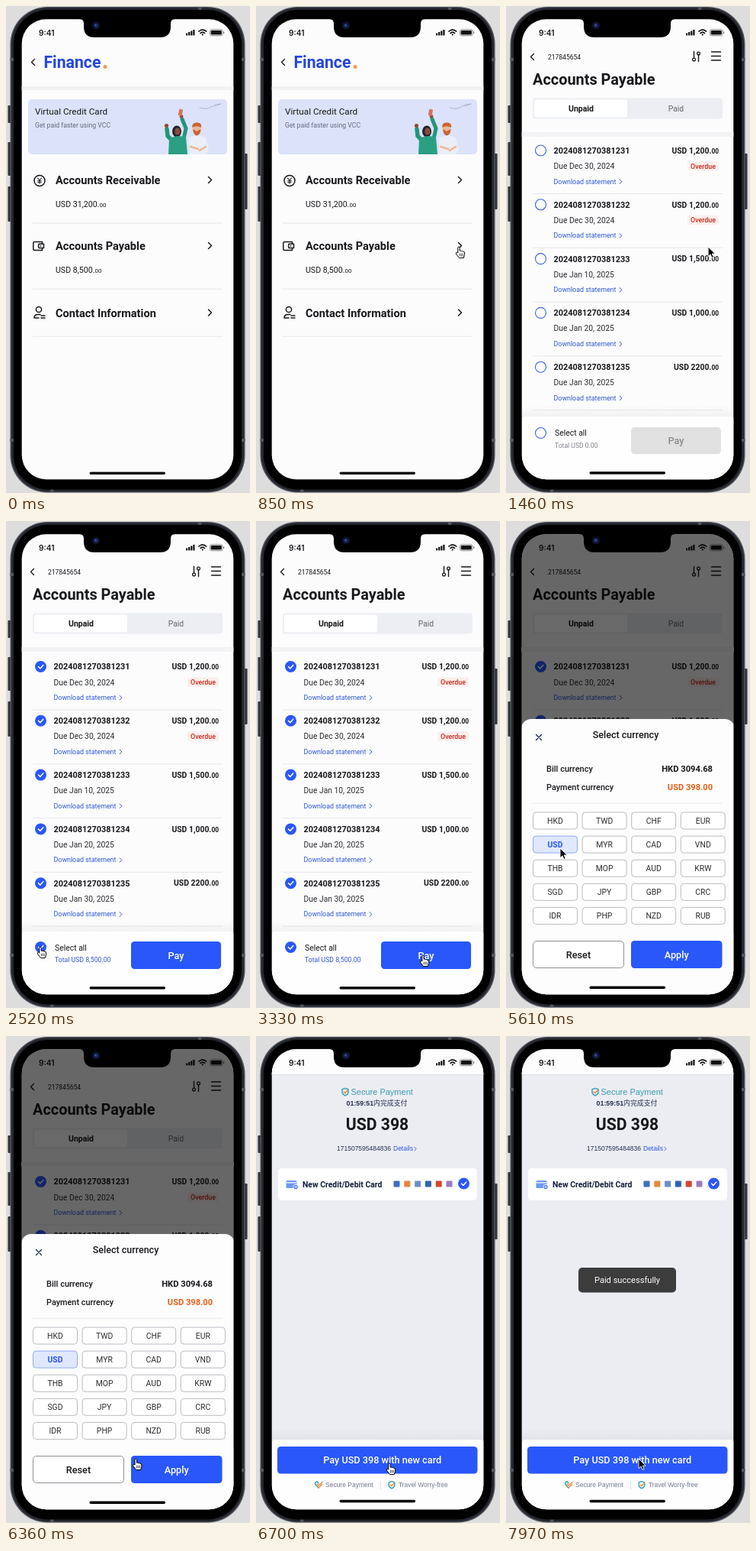
Animation, 320 px wide and 637 px high, one loop 8000 ms. Source, as an HTML page:

```html
<!DOCTYPE html>
<html lang="en">
<head>
<meta charset="utf-8">
<title>Paying a bill on the phone</title>
<style>
  html, body { margin: 0; width: 100%; height: 100%; overflow: hidden; background: #dedddd; }
  svg { display: block; width: 100%; height: 100%; }
  text { white-space: pre; }
</style>
</head>
<body>
<svg id="stage" viewBox="0 0 320 637" preserveAspectRatio="none"></svg>
<script>
const LOOP = 8000;
const INK = '#17181b', BLUE = '#2957fa', LINK = '#2f56d6';
const UI = 'Roboto, sans-serif', PLAIN = "'Liberation Sans', 'Noto Sans CJK SC', sans-serif";

// Drawing helpers; text is centred vertically on its capitals.
const text = (x, cy, size, str, { fill = INK, weight = 400, anchor = 'start', font = UI } = {}) =>
  `<text x="${x}" y="${cy + size * 0.36}" font-size="${size}" font-family="${font}" font-weight="${weight}" fill="${fill}" text-anchor="${anchor}">${str}</text>`;
const rect = (x, y, w, h, fill, r = 0, stroke = 'none') =>
  `<rect x="${x}" y="${y}" width="${w}" height="${h}" rx="${r}" fill="${fill}" stroke="${stroke}"/>`;
const circle = (x, y, r, fill, stroke = 'none', width = 1) =>
  `<circle cx="${x}" cy="${y}" r="${r}" fill="${fill}" stroke="${stroke}" stroke-width="${width}"/>`;
const line = (d, color = INK, width = 1.4) =>
  `<path d="${d}" fill="none" stroke="${color}" stroke-width="${width}" stroke-linecap="round" stroke-linejoin="round"/>`;
const shape = (d, fill) => `<path d="${d}" fill="${fill}"/>`;
const group = (id, content) => `<g id="${id}">${content}</g>`;
const rule = y => rect(35, y, 249, 1, '#e6e7ea');
const chevron = (x, y, s, color = INK, width = 1.4) => line(`M${x - s / 2} ${y - s}l${s} ${s}l${-s} ${s}`, color, width);
const back = (x, y) => line(`M${x + 2} ${y - 4}l-4 4l4 4`);
const tick = (x, y, r = 7.5) => circle(x, y, r, BLUE) + line(`M${x - 3} ${y}l2.3 2.4l4-4.4`, '#fff', 1.5);
const radio = (x, y, on) => on ? tick(x, y) : circle(x, y, 7, '#fff', '#3a62dc', 1.1);
const button = (x, y, w, h, label, fill, color, { stroke, labelX = x + w / 2 } = {}) =>
  rect(x, y, w, h, fill, 4.5, stroke) + text(labelX, y + h / 2, 12.7, label, { fill: color, weight: 500, anchor: 'middle' });
const amount = (str, cents) => `${str}<tspan font-size="${cents}">00</tspan>`;
const bottomBar = top => rect(21, top - 14, 278, 18, 'url(#shade)') + rect(21, top, 278, 620 - top, '#fefefe', 4);
const homeBar = y => rect(109.5, y, 99.5, 3.4, '#000', 1.7);
const shield = (x, y, s) => `<g transform="translate(${x} ${y}) scale(${s})">`
  + line('M0-4.6L4-3.2V.5Q4 3.2 0 5Q-4 3.2-4 .5V-3.2Z', '#35a3b4', 1.5) + line('M-1.8 0L-.2 1.6L3.6-2.4', '#ef8a3c', 1.5) + '</g>';

function statusBar() {
  const bars = [3, 4.5, 6, 7.5].map((h, i) => rect(236 + i * 3.1, 38.5 - h, 2.2, h, '#111', 0.6)).join('');
  return text(43, 35, 10.2, '9:41', { weight: 600, font: 'Inter, sans-serif' }) + bars
    + line('M253 33.2q4.8-4 9.6 0', '#111', 1.6) + line('M255 35.6q2.8-2.3 5.6 0', '#111', 1.6) + circle(257.8, 37.6, 1.1, '#111')
    + rect(267.5, 30.8, 16.5, 8, '#fff', 2.3, '#888') + rect(268.7, 32, 14.1, 5.6, '#111', 1.4) + rect(285, 33.2, 1.3, 3, '#888', 0.6);
}

function banner() {
  const people =
    line('M218 176L212 170L211 161', '#249579', 5.5) + circle(210.5, 156.5, 2.6, '#8a4d38')
    + line('M233 174L236 160L231 148', '#249579', 5) + circle(230, 144.5, 2.4, '#8a4d38')
    + `<g transform="rotate(12 229 139)">${rect(226.5, 135, 5, 8.5, '#d9735a', 1)}</g>`
    + `<ellipse cx="224" cy="164" rx="6" ry="7.5" fill="#20232f"/>` + `<ellipse cx="224.8" cy="164" rx="3.5" ry="4.6" fill="#8a4d38"/>`
    + shape('M214 174Q224 167 236 172L238 194H213Z', '#2a9f82')
    + shape('M240 173Q251 166 262 172L266 188L262 194H240Z', '#e9eef7')
    + line('M242 184L252 187M262 184L254 189', '#efb795', 2.6)
    + circle(250, 161, 5.4, '#efb795') + shape('M245 161Q246 169 250 169.5Q255 169 255.5 161L250 164Z', '#cc6430')
    + shape('M244 159Q244 152 250 152.5Q257 152 256 159Q250 155.5 244 159Z', '#cc6430')
    + line('M254 133Q263 136 269 132T282 128L274 131', '#8f98b4', 0.6);
  return rect(29, 122, 261, 72, '#dbe2f9', 5) + `<g clip-path="url(#banner)">${people}</g>`
    + text(38, 137.5, 11.7, 'Virtual Credit Card') + text(38, 156, 8.7, 'Get paid faster using VCC', { fill: '#646a7d' });
}

function homePage() {
  const rows = [['Accounts Receivable', 228], ['Accounts Payable', 314], ['Contact Information', 401.5]]
    .map(([label, y]) => text(65, y, 14.6, label, { weight: 600 }) + chevron(267.5, y - 0.5, 4, INK, 1.5)).join('');
  return rect(20, 17, 280, 603, '#fcfcfd') + back(35.5, 73.5)
    + text(49.5, 73.7, 21.2, 'Finance', { fill: '#2346e0', weight: 700 }) + circle(130, 79.5, 2.5, '#f29a4a')
    + rect(20, 105, 280, 5, '#f2f2f4') + banner() + rows
    + text(65, 259, 10.6, amount('USD 31,200.', 8)) + text(65, 345.2, 10.6, amount('USD 8,500.', 8))
    + circle(44, 228.5, 7, 'none', INK, 1.5) + line('M41.5 225l2.5 3l2.5-3M44 228v4.3M41.7 228.7h4.6M41.7 230.7h4.6', INK, 1.1)
    + line('M47 308.5H37.5Q35.8 308.5 35.8 310V318Q35.8 319.5 37.5 319.5H47.5V317M47.5 308.5V311M43 311.2H49.5V316.4H43Q42 313.8 43 311.2Z', INK, 1.5) + circle(45.4, 313.8, 0.9, INK)
    + circle(43, 397, 3.6, 'none', INK, 1.5) + line('M37 408Q37 403.4 42 403.4H45M37 408H43M46 405H51M46 408H51', INK, 1.5)
    + [283.5, 369.7, 431.7].map(rule).join('') + homeBar(609.4);
}

const BILLS = [['Dec 30, 2024', '1,200'], ['Dec 30, 2024', '1,200'], ['Jan 10, 2025', '1,500'], ['Jan 20, 2025', '1,000'], ['Jan 30, 2025', '2200']];

function payablePage(selected) {
  const rows = BILLS.map(([due, sum], i) => {
    const y = 189 + i * 70.8 + (selected ? 1.5 : 0);
    const overdue = i < 2 ? rect(238, y + 14, 41, 12.5, '#fcefec', 2.5)
      + text(258.5, y + 20.3, 8.9, 'Overdue', { fill: '#c8281c', weight: 500, anchor: 'middle' }) : '';
    return radio(45.5, y, selected) + text(62.5, y, 10.9, '202408127038123' + (i + 1), { weight: 600 })
      + text(279, y, 10.4, amount(`USD ${sum}.`, 8.4), { weight: 600, anchor: 'end' })
      + text(62.5, y + 20.3, 10.3, 'Due ' + due, { fill: '#2b2c30' })
      + text(62.5, y + 40.3, 8.9, 'Download statement', { fill: LINK }) + chevron(150.5, y + 40.7, 2.8, LINK, 1)
      + overdue + rule(y + 56);
  }).join('');
  return rect(20, 17, 280, 603, '#fcfcfd') + back(34.5, 66.5) + text(55, 66.5, 8.5, '217845654')
    + line('M246.5 59.5V68M252.5 64V72.5') + circle(246.5, 70, 1.9, '#fcfcfd', INK, 1.3) + circle(252.5, 62, 1.9, '#fcfcfd', INK, 1.3)
    + line('M269.5 60H281.5M269.5 65.5H281.5M269.5 71H281.5')
    + text(35, 96, 19.9, 'Accounts Payable', { weight: 600 })
    + rect(35, 120.5, 249, 27, '#eceef3', 4) + rect(37, 122.5, 122, 23, '#fff', 3)
    + text(98.5, 134, 10.5, 'Unpaid', { weight: 600, anchor: 'middle' }) + text(223, 134, 10.3, 'Paid', { fill: '#63666f', anchor: 'middle' })
    + rect(20, 165, 280, 6, '#f3f3f5') + rows + bottomBar(537)
    + radio(45.5, selected ? 557.5 : 558.5, selected) + text(64, 558.5, 10.4, 'Select all')
    + (selected ? text(64, 574, 8.7, 'Total USD 8,500.00', { fill: LINK }) + button(164, 550, 118, 36, 'Pay', BLUE, '#fff')
      : text(64, 574.5, 8.6, 'Total USD 0.00', { fill: '#80838b' }) + button(164, 551, 118, 35, 'Pay', '#e1e1e2', '#8c8c8f'))
    + homeBar(609);
}

const CURRENCIES = 'HKD TWD CHF EUR USD MYR CAD VND THB MOP AUD KRW SGD JPY GBP CRC IDR PHP NZD RUB'.split(' ');

function currencySheet(chosen) {
  const cells = CURRENCIES.map((code, i) => {
    const x = 35.5 + (i % 4) * 64.6, y = 381 + Math.floor(i / 4) * 31.1, on = chosen && code === 'USD';
    return rect(x, y, 58, 22, on ? '#dfe8fc' : '#fff', 4, on ? '#91aaf0' : '#b9bbc1')
      + text(x + 29, y + 10.8, 10.4, code, { fill: on ? BLUE : '#2b2c30', weight: on ? 700 : 400, anchor: 'middle' });
  }).join('');
  return rect(20, 259, 280, 420, '#fdfdfe', 13)
    + line('M39.5 279.5l7 7m0-7l-7 7', '#1d3155') + text(157, 279.2, 12.5, 'Select currency', { weight: 500, anchor: 'middle' })
    + text(53, 324.2, 11, 'Bill currency', { weight: 500 }) + text(53, 348.2, 10.9, 'Payment currency', { weight: 500 })
    + text(271, 324, 11.2, 'HKD 3094.68', { weight: 600, anchor: 'end' })
    + (chosen ? text(271, 348, 11.1, 'USD 398.00', { fill: '#e65f17', weight: 600, anchor: 'end' }) : '')
    + rule(368.7) + cells + button(35.5, 549.5, 119, 35, 'Reset', '#fff', INK, { stroke: '#8f9299' })
    + button(164, 549, 119.5, 36, 'Apply', chosen ? BLUE : '#e1e1e2', '#fff') + homeBar(608.6);
}

function paymentPage() {
  const plain = (x, y, size, str, fill, anchor) => text(x, y, size, str, { fill, anchor, font: PLAIN });
  const cards = ['#3d6fc4', '#e8853c', '#6b8fd0', '#2f64ad', '#d8442f', '#9b7bc0']
    .map((color, i) => rect(180.5 + i * 13.8, 189.5, 8, 8, color, 1)).join('');
  return rect(20, 17, 280, 603, '#ecedf3') + rect(20, 17, 280, 33, '#fdfdfe') + rect(20, 50, 280, 1, '#dfe0e5')
    + shield(117, 73, 1) + plain(124.5, 73, 11, 'Secure Payment', '#3a9db2')
    + plain(158.5, 87.3, 8.9, '<tspan font-weight="700">01:59:51</tspan>内完成支付', '#25304f', 'middle')
    + text(159, 115, 21.2, 'USD 398', { weight: 700, anchor: 'middle' })
    + plain(106, 147, 8.5, '171507595484836', '#25304f') + plain(180, 147, 8.5, 'Details', LINK) + chevron(209, 147.5, 2.3, LINK, 0.9)
    + rect(29, 173, 261, 42, '#fff', 4.5)
    + rect(39.5, 189, 14, 10, '#6f98f3', 1.5) + rect(39.5, 191, 14, 1.6, '#dfe8ff') + circle(52, 197.5, 3.2, '#3d6cea', '#fff') + line('M50.5 197.5h3M52 196v3', '#fff', 0.8)
    + text(61, 193.8, 10.4, 'New Credit/Debit Card', { weight: 600, fill: '#131d3c' }) + cards + tick(272.5, 193)
    + bottomBar(528) + button(28, 537, 262.5, 35.5, 'Pay USD 398 with new card', BLUE, '#fff', { labelX: 165.7 })
    + line('M82 591L77.8 586.5Q77 583 80 583Q82 584 82 585', '#35a3b4', 1.5) + line('M80 586L82 588L87 583.5M82 591L86.5 586.5', '#ef8a3c', 1.5)
    + plain(91, 587, 8.5, 'Secure Payment', '#6f7890') + rect(163, 582, 0.8, 11, '#e3d9d2')
    + shield(178, 587, 0.95) + plain(187, 587, 8.4, 'Travel Worry-free', '#6f7890') + homeBar(606.8);
}

function phoneBody() {
  const sides = [[2.5, 130, 23], [2.5, 178, 44], [2.5, 236, 46], [312.5, 193, 73]].map(([x, y, h]) => rect(x, y, 4, h, '#33353c', 1.2)).join('');
  return rect(0, 0, 320, 637, '#dedddd') + sides
    + rect(5.5, 1, 308, 635.5, '#50525a', 49) + rect(7, 2.2, 305, 633, '#25272e', 48)
    + [[5.5, 68], [309, 68], [5.5, 566], [309, 566], [252, 1], [58, 632]].map(([x, y]) => rect(x, y, 4.5, 4, '#54565d')).join('')
    + rect(10, 5, 299, 627.5, '#000', 45);
}

const notch = shape('M96 17Q102 17 102 23V27Q102 41 116 41H202Q216 41 216 27V23Q216 17 222 17V14H96Z', '#000')
  + circle(118, 25.5, 5, '#10142a') + circle(118, 25.5, 2.6, '#1d2a66') + circle(117.4, 25, 1, '#4a62b8');
const toast = rect(95, 303, 128, 32.5, '#3c3c3d', 5) + text(159, 319.5, 11.1, 'Paid successfully', { fill: '#fff', anchor: 'middle' });
const arrow = '<path d="M0 0V12.6L3 9.9L5 14.4L7.2 13.4L5.2 9.1H9.2Z" fill="#000" stroke="#fff" stroke-width=".9"/>';
const hand = '<path d="M-1.2 8V1.2a1.2 1.2 0 0 1 2.4 0V5.2Q2.5 4.6 3.4 5.7Q4.7 5 5.6 6.2Q7.6 5.8 7.6 8V10.5L6.3 14.5H.5L-3.6 9.2Q-4 7-2.4 7.2Z" fill="#fff" stroke="#000" stroke-width="1"/>'
  + line('M1.4 9v3M3.4 9v3M5.3 9v3', '#000', 0.7);

const defs = `<defs><clipPath id="screen">${rect(20.7, 17.2, 277.6, 602, '#000', 32)}</clipPath>`
  + `<clipPath id="banner">${rect(29, 122, 261, 72, '#000', 5)}</clipPath>`
  + '<linearGradient id="shade" x2="0" y2="1"><stop stop-color="#555" stop-opacity="0"/><stop offset="1" stop-color="#555" stop-opacity=".08"/></linearGradient></defs>';

document.getElementById('stage').innerHTML = defs + phoneBody()
  + `<g clip-path="url(#screen)">` + group('home', homePage()) + group('unpaid', payablePage(false)) + group('selected', payablePage(true))
  + group('payment', paymentPage()) + statusBar() + group('dim', rect(20, 17, 280, 603, '#000'))
  + group('sheet', group('blank', currencySheet(false)) + group('chosen', currencySheet(true))) + '</g>'
  + notch + group('toast', toast) + group('cursor', group('arrow', arrow) + group('hand', hand));

const el = id => document.getElementById(id);
const show = (id, visible) => el(id).setAttribute('display', visible ? 'inline' : 'none');
const clamp = v => Math.min(1, Math.max(0, v));
const progress = (t, from, to) => clamp((t - from) / (to - from));
const ease = p => p * p * (3 - 2 * p);

// Cursor stops: time, x, y.
const PATH = [[30, 325, 550], [760, 266, 315], [1640, 265, 315], [2400, 45, 557], [2680, 45, 557], [3230, 219, 568],
  [4120, 219, 568], [4820, 74, 441], [4960, 71, 428], [5760, 71, 428], [6450, 175, 559], [7400, 175, 559], [7560, 174, 553], [8000, 174, 553]];
const HAND_TIMES = [[700, 900], [2350, 2600], [3080, 3500], [6350, 7480]];

function cursorAt(t) {
  const i = PATH.findIndex(stop => stop[0] >= t);
  if (i <= 0) return PATH[0].slice(1);
  const [a, b] = [PATH[i - 1], PATH[i]], p = ease(progress(t, a[0], b[0]));
  return [a[1] + (b[1] - a[1]) * p, a[2] + (b[2] - a[2]) * p];
}

function draw(now) {
  const t = now % LOOP;
  const open = t < 6580 ? 1 - (1 - progress(t, 3420, 3760)) ** 3 : 0;
  show('home', t < 900);
  show('unpaid', t >= 900 && t < 2510);
  show('selected', t >= 2510 && t < 6580);
  show('payment', t >= 6580);
  show('sheet', open > 0);
  show('blank', t < 5000);
  show('chosen', t >= 5000);
  el('dim').setAttribute('opacity', open * 0.59);
  el('sheet').setAttribute('transform', `translate(0 ${(1 - open) * 361})`);
  el('toast').setAttribute('opacity', progress(t, 7480, 7600));
  const pointing = HAND_TIMES.some(([from, to]) => t >= from && t < to);
  show('hand', pointing);
  show('arrow', !pointing);
  el('cursor').setAttribute('transform', `translate(${cursorAt(t)})`);
  requestAnimationFrame(() => draw(performance.now()));
}
draw(performance.now());
</script>
</body>
</html>
```
